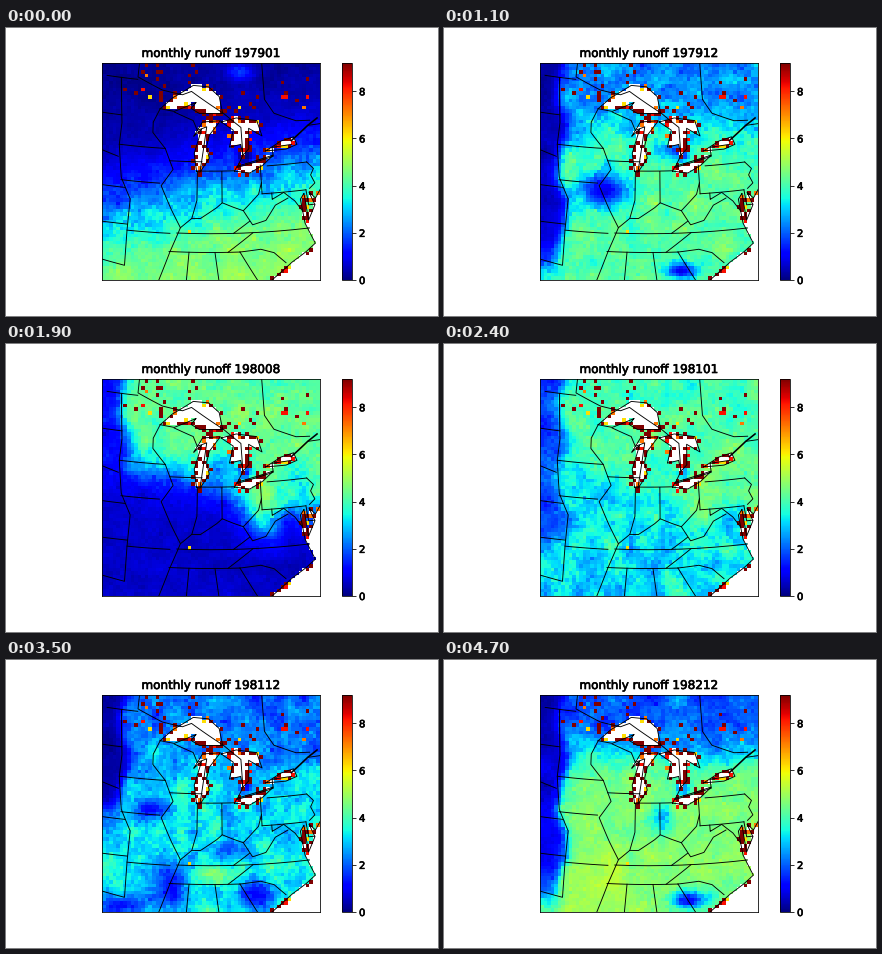
A matplotlib script for the animation above (4.8 s loop, 432 by 288 pixels).

```python
import numpy as np
import matplotlib.pyplot as plt
from matplotlib.animation import FuncAnimation
from matplotlib.path import Path
from matplotlib.patheffects import withStroke

W, H, DPI = 432, 288, 72
LEFT, TOP, WIDTH, HEIGHT = 96, 35, 218, 217
CELLS = 61
HALF = 1000            # half width of the map in km
LON0, LAT0 = -86, 41.7
VMAX = 9.2

plt.rcParams["font.family"] = "DejaVu Sans"
fig = plt.figure(figsize=(W / DPI, H / DPI), dpi=DPI, facecolor="white")


def add_axes(x, w):
    return fig.add_axes([x / W, 1 - (TOP + HEIGHT) / H, w / W, HEIGHT / H])


ax = add_axes(LEFT, WIDTH)
cax = add_axes(336, 10)


# ---- map outlines ----
def project(lon, lat):
    """Lambert conformal conic with one standard parallel, in km."""
    p0, p = np.radians(LAT0), np.radians(lat)
    n = np.sin(p0)
    rho0 = 6371 / np.tan(p0)
    rho = rho0 * (np.tan(np.pi / 4 + p0 / 2) / np.tan(np.pi / 4 + p / 2)) ** n
    a = n * np.radians(lon - LON0)
    return rho * np.sin(a), rho0 - rho * np.cos(a)


def line(*points, lw=0.9):
    """Draw a polyline through (lon, lat) points."""
    lon, lat = np.array(points, float).T
    t = np.arange(len(lon))
    fine = np.linspace(0, t[-1], 8 * t[-1] + 1)
    xy = project(np.interp(fine, t, lon), np.interp(fine, t, lat))
    ax.plot(*xy, color="k", lw=lw, zorder=3)
    return np.column_stack(xy)


def parallel(lat, west, east):
    line((west, lat), (east, lat))


def shore(*points):
    return Path(line(*points, points[0]))


superior = shore((-92.1, 46.75), (-90.4, 46.6), (-87.8, 47.4), (-88.4, 46.9), (-87.4, 46.5),
                 (-84.6, 46.5), (-85, 47.9), (-86.3, 48.7), (-88.2, 48.8), (-90.7, 47.7))
michigan = shore((-87.6, 41.7), (-87.9, 43.2), (-87.1, 45.2), (-88, 44.6), (-87, 45.8),
                 (-84.9, 45.9), (-86.2, 44.7), (-86.5, 43.8), (-86.2, 42.8), (-87.2, 41.65))
huron = shore((-84.8, 45.8), (-83, 46.1), (-80.6, 45.8), (-80.1, 44.5), (-81.6, 45.2),
              (-81.7, 43.5), (-82.4, 43), (-82.6, 43.9), (-83.9, 43.7), (-83.4, 45.1))
erie = shore((-83.4, 41.7), (-83.1, 42.1), (-80.4, 42.6), (-79, 42.85), (-80.2, 42.1), (-81.7, 41.5))
ontario = shore((-79.8, 43.25), (-78, 43.95), (-76.5, 44.2), (-76.2, 43.55), (-77.5, 43.25))
ocean = shore((-74.1, 39.8), (-74.9, 38.95), (-75.5, 39.5), (-75.05, 38.4), (-75.9, 37.2),
              (-76.05, 39.45), (-76.5, 39), (-76.3, 37), (-75.5, 35.25), (-76.5, 34.65),
              (-78, 33.9), (-81, 32), (-70, 32), (-70, 39.8))
water = [superior, michigan, huron, erie, ontario, ocean]

# national and provincial borders
parallel(49, -99, -95.15)
parallel(45, -74.7, -71)
line((-95.15, 52), (-95.15, 49.2), (-92, 48.3), (-89.5, 48), (-88.4, 48.3), (-84.5, 46.5),
     (-82.5, 45.3), (-82.4, 43), (-83.1, 42), (-79, 42.75), (-79.05, 43.5), (-76.8, 43.6))
line((-76.8, 43.9), (-74.7, 45), (-73.5, 45.5), lw=1.6)
line((-79.5, 52), (-79.5, 47.5), (-78.5, 46.3), (-76, 45.5), (-74.4, 45.4))

# straight state lines
for border in [(45.94, -99, -96.55), (43.5, -96.45, -91.2), (42.5, -90.65, -87),
               (41.73, -87.2, -83.45), (40.6, -95.8, -91.6), (40, -99, -95.3),
               (39.72, -80.52, -75.8), (42, -79.76, -75.35), (37, -99, -94.6),
               (36.5, -94.6, -90.2), (36.55, -89.5, -75.9), (35, -90.2, -83.1)]:
    parallel(*border)
line((-87.5, 41.7), (-87.5, 39.3), (-88, 37.8))
line((-84.8, 41.7), (-84.82, 39.1))
line((-80.52, 42.1), (-80.52, 39.72))
line((-85.6, 35), (-85.2, 32.5))
line((-88.2, 35), (-88.4, 32.5))
line((-75.8, 39.72), (-75.7, 38.46), (-75.05, 38.45))

# rivers and ridges
line((-97.2, 49), (-96.45, 45.3), (-96.45, 43.5), (-95.8, 40.8), (-94.6, 39.1),
     (-94.6, 36.5), (-94.5, 33.6), (-99, 34.2))
line((-99, 43), (-96.4, 42.5))
line((-92.1, 46.75), (-92.8, 45.6), (-92.75, 44.75), (-91.2, 43.5), (-90.2, 41.8),
     (-91.4, 40.4), (-90.2, 38.5), (-89.15, 37), (-90.1, 35), (-91.1, 32.5))
line((-90.4, 46.55), (-88.1, 45.9), (-87.6, 45.1), (-86.5, 45.4), (-87.2, 41.76))
line((-89.15, 37), (-88, 37.8), (-87.1, 37.8), (-85.4, 38.7), (-84.8, 39.1), (-83.6, 38.7),
     (-82.6, 38.4), (-80.9, 39.7), (-80.52, 40.64))
line((-75.35, 42), (-74.7, 41.4), (-75.1, 40.9), (-74.75, 40.2), (-75.4, 39.8))
line((-82.6, 38.4), (-81.7, 37.2), (-80.3, 37.5), (-79.2, 38.7), (-77.8, 39.2))
line((-79.48, 39.72), (-79.48, 39.2), (-78.2, 39.7), (-77.1, 38.9), (-76.4, 38))
line((-82, 37.5), (-83.7, 36.55))
line((-81.7, 36.55), (-84.3, 35))
line((-83.1, 35), (-81, 35.15), (-79.7, 34.8), (-78.6, 33.9))
line((-83.1, 35), (-81.4, 32.5))

# ---- runoff fields ----
mid = (np.arange(CELLS) + 0.5) / CELLS
px, py = np.meshgrid(LEFT + mid * WIDTH, TOP + mid * HEIGHT)
kx, ky = np.meshgrid((2 * mid - 1) * HALF, (1 - 2 * mid) * HALF)


def step(v, width):
    return 1 / (1 + np.exp(-v / width))


def scene(north, south, front, width, tilt=0, dry=0.0, reach=150, spots=()):
    """North-south contrast across a front, a dry western edge and local spots."""
    z = north + (south - north) * step(py + tilt * (px - 205) - front, width)
    for x, y, rx, ry, amp in spots:
        z = z + amp * np.exp(-((px - x) / rx) ** 2 - ((py - y) / ry) ** 2)
    edge = 119 + 5 * np.sin(py / 13) - px
    return z * (1 - dry * step(edge, 3) * step(reach - py, 8))


scenes = {
    0: scene(0.2, 4.9, 160, 25, 0.25, spots=[(235, 44, 12, 8, 1.4)]),
    11: scene(2.4, 4.2, 105, 12, 0, 0.85, 235,
              [(160, 163, 26, 18, -3.4), (236, 243, 16, 8, -3.4), (228, 122, 12, 8, -2)]),
    19: scene(4.3, 0.6, 140, 11, -0.25, 0.7, 120,
              [(255, 165, 20, 28, 2.8), (215, 120, 20, 14, -1), (290, 125, 14, 12, -1)]),
    30: scene(4.2, 1.6, 205, 18, 0, 0.85, 165,
              [(145, 163, 16, 13, 1), (145, 122, 22, 9, -2.4), (200, 130, 22, 30, -1),
               (245, 238, 22, 12, -1.4)]),
    35: scene(2.2, 3.3, 105, 12, 0, 0.88, 155,
              [(145, 148, 18, 12, -2), (165, 225, 16, 26, -2.2), (222, 188, 24, 9, -1.6),
               (208, 214, 24, 9, 1.5), (115, 245, 24, 12, -2), (250, 235, 18, 14, -2)]),
    42: scene(4.5, 2, 160, 22, 0, 0.85, 125,
              [(294, 86, 14, 6, -2.5), (190, 215, 30, 12, -1), (225, 83, 16, 7, -2)]),
    47: scene(2, 4.7, 98, 10, 0, 0.8, 235,
              [(245, 240, 18, 9, -3.6), (215, 160, 12, 14, -2), (160, 225, 30, 30, 0.6)]),
}
for april in range(3, 48, 12):
    scenes[april] = scene(3.7, 4.7, 100, 20, 0, 0.5, 200)
keys = sorted(scenes)

# ---- land mask and permanently high cells ----
centres = np.column_stack([kx.ravel(), ky.ravel()])
wet = np.any([p.contains_points(centres) for p in water], axis=0).reshape(CELLS, CELLS)


def grow(m):
    p = np.pad(m, 1, mode="edge")
    return p[:-2, 1:-1] | p[2:, 1:-1] | p[1:-1, :-2] | p[1:-1, 2:]


rng = np.random.default_rng(7)
rim, bank = wet & grow(~wet), ~wet & grow(wet)
chance = rng.random(wet.shape)
high = (rim & (chance < 0.5)) | (bank & (chance < 0.3))

# small lakes scattered across the north
for x, y, spread, count in [(145, 52, 10, 16), (184, 46, 4, 6), (240, 75, 9, 7), (288, 62, 11, 8)]:
    col = (rng.normal(x, spread, count) - LEFT) / WIDTH * CELLS
    row = (rng.normal(y, spread, count) - TOP) / HEIGHT * CELLS
    high[row.clip(0, CELLS - 1).astype(int), col.clip(0, CELLS - 1).astype(int)] = True
wet &= ~high
peak = rng.choice([9.2, 8.2, 7.2, 6.2], wet.shape, p=[0.7, 0.14, 0.1, 0.06])
speck = (abs(px - 183) < 1.8) & (abs(py - 202.5) < 1.8)
high, peak = high | speck, np.where(speck, 6.2, peak)


def blobs(gen, k, amp):
    """Smooth noise: a coarse random grid stretched over the cells."""
    src = (np.arange(k) + 0.5) / k
    rows = np.array([np.interp(mid, src, r) for r in gen.normal(0, amp, (k, k))])
    return np.array([np.interp(mid, src, c) for c in rows.T]).T


still = blobs(rng, 20, 0.2)
dip = 2.2 * np.exp(-((px - 239) ** 2 + (py - 128) ** 2) / 49)


def runoff(i):
    k = min(np.searchsorted(keys, i, "right") - 1, len(keys) - 2)
    a, b = keys[k:k + 2]
    u = (i - a) / (b - a)
    base = (1 - u) * scenes[a] + u * scenes[b] - dip
    gen = np.random.default_rng(100 + i)
    noise = still + blobs(gen, 18, 0.35) + gen.normal(0, 0.22, base.shape)
    calm = np.clip(base / 2.5, 0.25, 1) * np.clip((6.4 - base) / 3, 0.4, 1)
    z = np.clip(base + noise * calm, 0.05, VMAX)
    return np.ma.array(np.where(high, peak, z), mask=wet)


# ---- figure ----
image = ax.imshow(runoff(0), cmap="jet", vmin=0, vmax=VMAX, interpolation="nearest",
                  extent=(-HALF, HALF, -HALF, HALF), aspect="auto", zorder=1)
ax.set(xlim=(-HALF, HALF), ylim=(-HALF, HALF), xticks=[], yticks=[])
bar = fig.colorbar(image, cax=cax, ticks=range(0, 9, 2))
title = ax.set_title("", fontsize=12)
for label in [title, *bar.ax.get_yticklabels()]:
    label.set_path_effects([withStroke(linewidth=0.65, foreground="k")])


def update(i):
    image.set_data(runoff(i))
    title.set_text(f"monthly runoff {1979 + i // 12}{i % 12 + 1:02d}")
    return image, title


anim = FuncAnimation(fig, update, frames=48, interval=100, repeat=True, repeat_delay=0)
plt.show()
```
